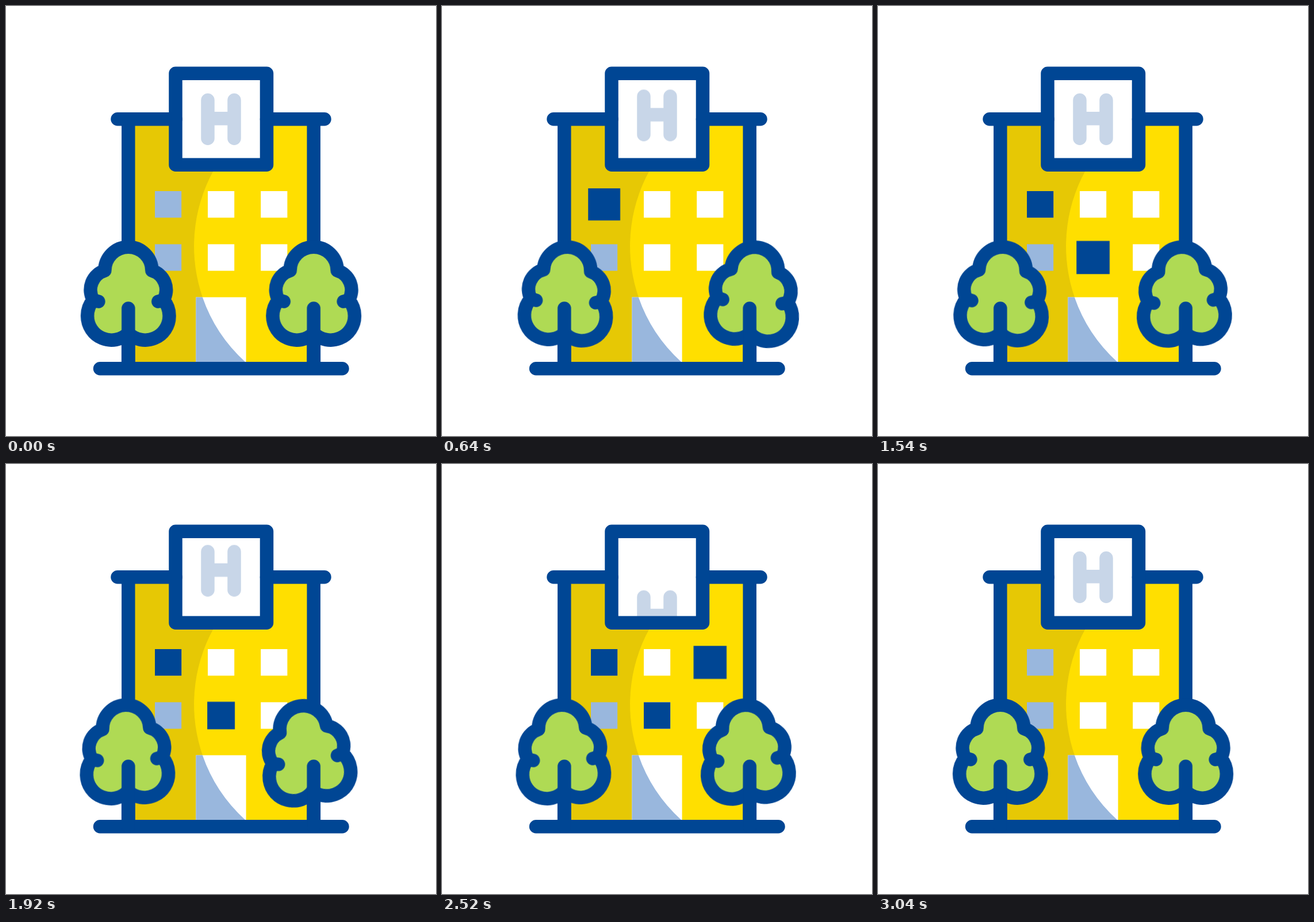
An HTML page without scripts for the animation above (3.14 s loop, 748x748 px).

```html
<!DOCTYPE html>
<html lang="en">
<head>
<meta charset="utf-8">
<title>Hospital</title>
<style>
  html, body { margin: 0; width: 100%; height: 100%; overflow: hidden; background: #fff; }
  svg { display: block; width: 100vw; height: 100vh; }

  .line { fill: none; stroke: #004694; stroke-width: 23.5; stroke-linecap: round; stroke-linejoin: round; }
  .letter { fill: none; stroke: #c8d6e8; stroke-width: 23.5; stroke-linecap: round; }
  .leaf { fill: #afda54; }
  .dim { fill: #99b7dd; }
  .pane { fill: #fff; }
  .dark { fill: #004694; transform-box: fill-box; transform-origin: center; }
  .crown { transform-origin: 0 582px; }

  .letter, .dark, .crown {
    animation: 3140ms cubic-bezier(.37, 0, .63, 1) infinite both;
  }
  .letter { animation-name: hop; }
  .sway-a { animation-name: sway-a; }
  .sway-b { animation-name: sway-b; }
  .pop-a { animation-name: pop-a; }
  .pop-b { animation-name: pop-b; }
  .pop-c { animation-name: pop-c; }

  @keyframes hop {
    0%, 2.55% { transform: translateY(0); }
    15.92% { transform: translateY(-21px); }
    29.3% { transform: translateY(36px); }
    47.13%, 53.5% { transform: translateY(0); }
    65.6% { transform: translateY(-16px); }
    78.98% { transform: translateY(75px); }
    89.49% { transform: translateY(-122px); }
    96.18%, 100% { transform: translateY(0); }
  }
  @keyframes sway-a {
    0%, 5.73% { transform: rotate(0deg); }
    34.39% { transform: rotate(4.4deg); }
    69.75% { transform: rotate(-2.8deg); }
    96.82%, 100% { transform: rotate(0deg); }
  }
  @keyframes sway-b {
    0%, 10.19% { transform: rotate(0deg); }
    27.39% { transform: rotate(6.2deg); }
    65.6% { transform: rotate(-9deg); }
    90.13%, 100% { transform: rotate(0deg); }
  }
  @keyframes pop-a {
    0%, 8.92% { transform: scale(0); }
    21.97% { transform: scale(1.25); }
    39.49%, 88.5% { transform: scale(1); }
    96.18%, 100% { transform: scale(0); }
  }
  @keyframes pop-b {
    0%, 35.03% { transform: scale(0); }
    48.09% { transform: scale(1.25); }
    65.6%, 88.5% { transform: scale(1); }
    96.18%, 100% { transform: scale(0); }
  }
  @keyframes pop-c {
    0%, 65.6% { transform: scale(0); }
    79.3% { transform: scale(1.25); }
    88.5% { transform: scale(1); }
    96.18%, 100% { transform: scale(0); }
  }
</style>
</head>
<body>
<svg viewBox="0 0 748 748">
  <defs>
    <clipPath id="body"><path d="M212 197H295V276H453V197H535V630H212z"/></clipPath>
    <path id="crown" d="M-41 460.3A41 41 0 1 1 41 460.3A35 35 0 0 1 61 511.5
      A41.75 41.75 0 0 1 71.2 539.5A41.75 41.75 0 0 1 0 569
      A41.75 41.75 0 0 1 -71.2 539.5A41.75 41.75 0 0 1 -61 511.5A35 35 0 0 1 -41 460.3z
      M-61 511.5L-52 514M61 511.5L52 514"/>
    <path id="trunk" d="M0 526V630"/>
  </defs>

  <!-- the letter sits behind the building and shows through the sign -->
  <path class="letter" d="M351 163.7V230.3M397 163.7V230.3M351 195.7H397"/>

  <g clip-path="url(#body)">
    <path fill="#ffdf00" d="M212 197H535V630H212z"/>
    <path fill="#e6c805" d="M212 197V630H416V619A272 272 0 0 1 426 208V197z"/>
  </g>

  <g class="pane">
    <rect x="351" y="322" width="46.2" height="46.2"/>
    <rect x="443.2" y="322" width="46.2" height="46.2"/>
    <rect x="351" y="414.4" width="46.2" height="46.2"/>
    <rect x="443.2" y="414.4" width="46.2" height="46.2"/>
    <rect x="330.4" y="506.6" width="87.2" height="118"/>
  </g>
  <g class="dim">
    <rect x="259" y="322" width="46.2" height="46.2"/>
    <rect x="259" y="414.4" width="46.2" height="46.2"/>
    <path d="M330.4 506.6H341.8A272 272 0 0 0 416 619V624H330.4z"/>
  </g>

  <rect class="dark pop-a" x="259" y="322" width="46.2" height="46.2"/>
  <rect class="dark pop-b" x="351" y="414.4" width="46.2" height="46.2"/>
  <rect class="dark pop-c" x="443.2" y="322" width="46.2" height="46.2"/>

  <path class="line" d="M194 196.8H295M453.5 196.8H554M212.8 196.8V630M535.2 196.8V630M163.5 630.7H585"/>
  <rect class="line" x="295" y="117.3" width="158.5" height="159"/>

  <g transform="translate(212.8)">
    <use href="#crown" class="line leaf crown sway-a"/>
    <use href="#trunk" class="line"/>
  </g>
  <g transform="translate(535.2)">
    <use href="#crown" class="line leaf crown sway-b"/>
    <use href="#trunk" class="line"/>
  </g>
</svg>
</body>
</html>
```
